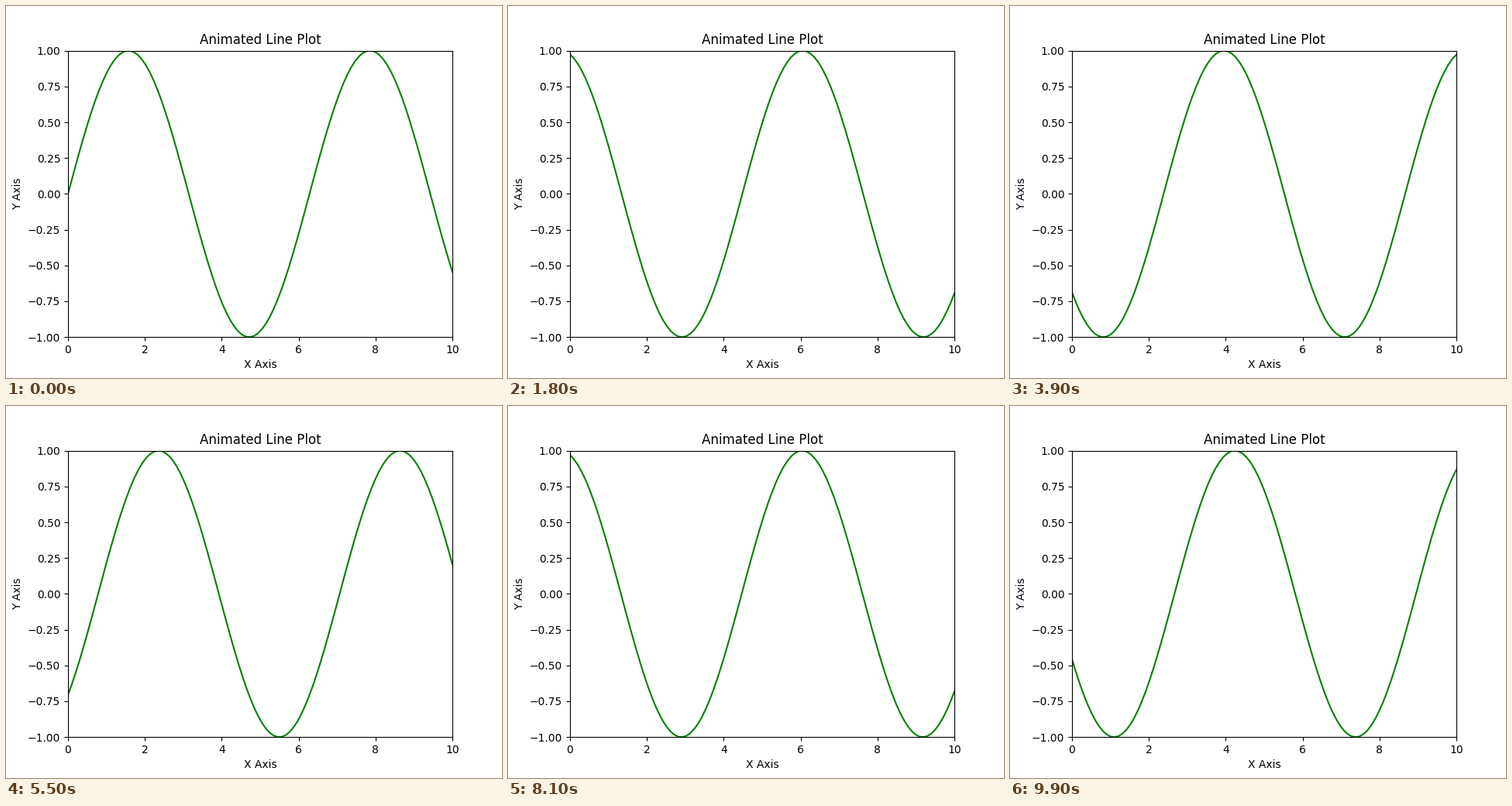
A matplotlib script that plays this animation: 640x480 px, repeating every 10000 ms.

```python
import numpy as np
import matplotlib.pyplot as plt
from matplotlib.animation import FuncAnimation

FRAMES = 100
INTERVAL = 100  # ms
PHASE_STEP = 0.1

fig, ax = plt.subplots(figsize=(6.4, 4.8), dpi=100)
ax.set_xlim(0, 10)
ax.set_ylim(-1, 1)
ax.set_title("Animated Line Plot")
ax.set_xlabel("X Axis")
ax.set_ylabel("Y Axis")

x = np.linspace(0, 10, 100)
line, = ax.plot(x, np.sin(x), color="green")


def update(i):
    line.set_ydata(np.sin(x + PHASE_STEP * i))
    return line,


anim = FuncAnimation(fig, update, frames=FRAMES, interval=INTERVAL,
                     repeat=True, repeat_delay=0, blit=False)
plt.show()
```
